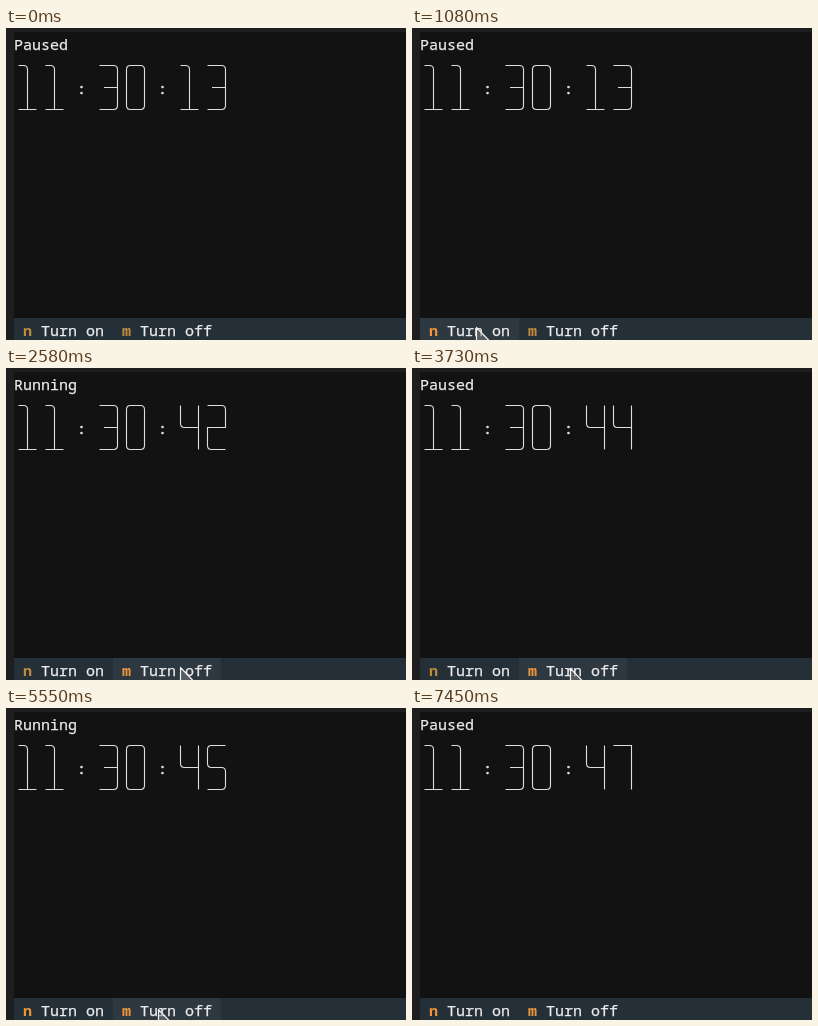
Write an HTML page that moves like this. It is 400 px wide and 312 px high and loops after 8110 ms.

```html
<!DOCTYPE html>
<html lang="en">
<head>
<meta charset="utf-8">
<title>Terminal clock</title>
<style>
  html, body { margin: 0; width: 100%; height: 100%; overflow: hidden; background: #1e1e1e; }
  svg { display: block; width: 400px; height: 312px; }
  text {
    font: 15px "Noto Sans Mono", "DejaVu Sans Mono", monospace;
    fill: #ececec; stroke: #ececec; stroke-width: .25; white-space: pre;
  }
  .key { font-weight: 700; stroke: none; }
  .digit { fill: none; stroke: #dedede; stroke-width: 1.1; }
  .colon { fill: #d4f0e2; stroke: #d4f0e2; stroke-width: .6; }
</style>
</head>
<body>
<svg viewBox="0 0 400 312">
  <rect width="400" height="312" fill="#1e1e1e"/>
  <rect x="8" y="4" width="392" height="286" fill="#121212"/>
  <rect x="8" y="290" width="392" height="22" fill="#242f38"/>
  <rect id="hover" y="290" height="22" fill="#2e3840"/>
  <text id="status" x="8" y="22"></text>
  <g id="clock"></g>
  <text id="keyN" class="key" x="17" y="308">n</text>
  <text x="35" y="308">Turn on</text>
  <text id="keyM" class="key" x="116" y="308">m</text>
  <text x="134" y="308">Turn off</text>
  <path id="cursor" d="M.5 .5V18L4.5 16 7.5 20.5H10.5V16L12.5 13Z"
    fill="#808080" fill-opacity=".5" stroke="#f2f2f2" stroke-width="1.2" stroke-linejoin="round"/>
</svg>
<script>
const LOOP = 8110, STEP = 40, CELL = 9, LEFT = 8, BAR_TOP = 290;
const DULL = '#c08c3c', BRIGHT = '#ec963c';
const $ = id => document.getElementById(id);

// Digit strokes on a grid of 18 by 44
const GLYPHS = [
  'M0 4q0-4 4-4H14q4 0 4 4V40q0 4-4 4H4q-4 0-4-4Z',
  'M0 0H5q4 0 4 4V44M0 44H18',
  'M0 0H14q4 0 4 4V22H0V40q0 4 4 4H18',
  'M0 0H14q4 0 4 4V40q0 4-4 4H0M4.5 22H18',
  'M0 0V18q0 4 4 4H18M18 0V44',
  'M18 0H4q-4 0-4 4V18q0 4 4 4H14q4 0 4 4V40q0 4-4 4H0',
  'M18 0H4q-4 0-4 4V40q0 4 4 4H14q4 0 4-4V26q0-4-4-4H0',
  'M0 0H18V44'
];

// The clock jumps from 13 to 40 at the first tick, then counts up
const TICKS = [1410, 1470, 1530, 2870, 2930, 4580, 6240, 6300];
const TOGGLES = [1410, 2990, 4580, 6360];

// Each move is a curve from where the last one ended
const ORIGIN = [380, 0];
const MOVES = [
  { at: 120, ms: 240, via: [300, 60], to: [140, 187] },
  { at: 520, ms: 560, via: [159, 166], to: [64, 299] },
  { at: 1940, ms: 640, via: [205, 294], to: [174, 299] },
  { at: 3730, ms: 160, via: [134, 302], to: [93, 298] },
  { at: 4140, ms: 280, via: [86, 298], to: [79, 297] },
  { at: 4740, ms: 0, via: [70, 297], to: [64, 297] },
  { at: 5310, ms: 240, via: [200, 299], to: [152, 301] },
  { at: 5710, ms: 80, via: [160, 301], to: [169, 301] },
  { at: 6850, ms: 560, via: [401, 265], to: [395, 20] }
];
const ENTER = 120, LEAVE = 7450;

// Keys keep their glow after their second visit
const KEEP_N = 4740, KEEP_M = 6850;

const passed = (times, t) => times.filter(s => s <= t).length;

function pointerAt(t) {
  if (t < ENTER || t >= LEAVE) return null;
  const i = passed(MOVES.map(m => m.at), t) - 1;
  const { at, ms, via, to } = MOVES[i];
  const from = i ? MOVES[i - 1].to : ORIGIN;
  const u = Math.min(1, (Math.floor((t - at) / STEP) + 1) / (ms / STEP + 1));
  const v = 1 - u;
  return from.map((a, n) => Math.round(v * v * a + 2 * u * v * via[n] + u * u * to[n]));
}

function add(tag, attrs) {
  const el = document.createElementNS('http://www.w3.org/2000/svg', tag);
  for (const name in attrs) el.setAttribute(name, attrs[name]);
  return $('clock').appendChild(el);
}

const digits = [];
[...'11:30:13'].forEach((ch, i) => {
  const x = LEFT + i * 3 * CELL;
  if (ch === ':') {
    add('text', { x: x + CELL, y: 66, class: 'colon' }).textContent = ch;
  } else {
    digits.push(add('path', {
      d: GLYPHS[ch], class: 'digit', transform: `translate(${x + 4.5} 37.5)`
    }));
  }
});

function showHover(x, width) {
  $('hover').setAttribute('x', x);
  $('hover').setAttribute('width', width);
}

function draw(t) {
  const ticks = passed(TICKS, t);
  const secs = ticks ? 39 + ticks : 13;
  $('status').textContent = passed(TOGGLES, t) % 2 ? 'Running' : 'Paused';
  digits[4].setAttribute('d', GLYPHS[Math.floor(secs / 10)]);
  digits[5].setAttribute('d', GLYPHS[secs % 10]);

  const pos = pointerAt(t);
  $('cursor').style.display = pos ? '' : 'none';
  if (pos) $('cursor').setAttribute('transform', `translate(${pos})`);

  const onBar = pos && pos[1] >= BAR_TOP;
  const overN = onBar && pos[0] < 107;
  const overM = onBar && !overN && pos[0] < 215;
  showHover(overM ? 107 : 8, overN ? 99 : overM ? 108 : 0);
  $('keyN').style.fill = overN || t >= KEEP_N ? BRIGHT : DULL;
  $('keyM').style.fill = overM || t >= KEEP_M ? BRIGHT : DULL;
}

const begin = performance.now();
function frame() {
  draw((performance.now() - begin) % LOOP);
  requestAnimationFrame(frame);
}
frame();
</script>
</body>
</html>
```
